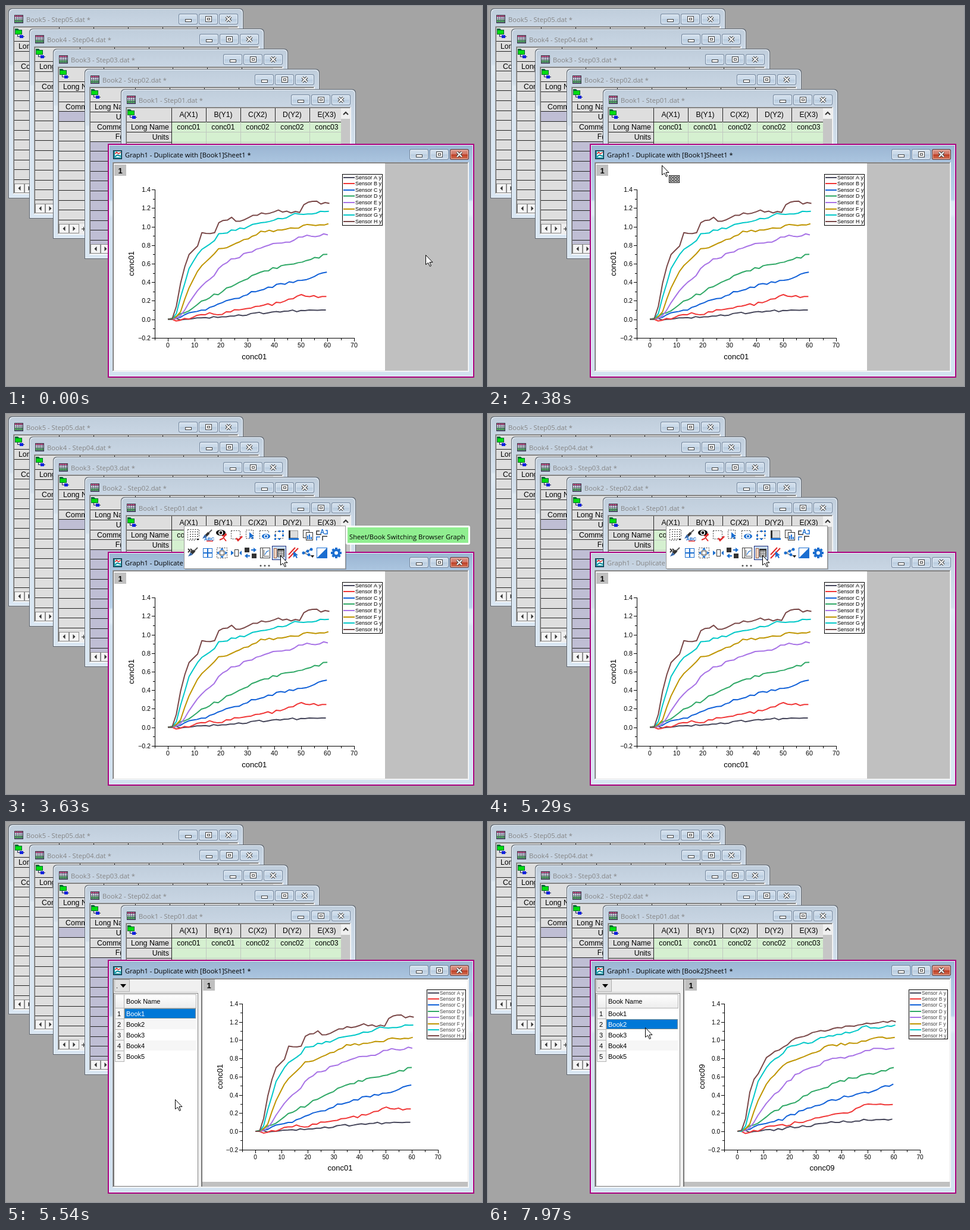
Animation, 800 px wide and 640 px high, one loop 8000 ms. Source, as an HTML page with a canvas:

```html
<!DOCTYPE html>
<html lang="en">
<head>
<meta charset="utf-8">
<title>Graph browser</title>
<style>
html, body { margin: 0; width: 100%; height: 100%; overflow: hidden; background: #a4a4a4; }
canvas { display: block; }
</style>
</head>
<body>
<canvas id="stage" width="800" height="640"></canvas>
<script>
const c = document.getElementById('stage').getContext('2d');
const UI = '11.23px "Open Sans", sans-serif';
const sans = size => `${size}px "Liberation Sans", Arial, sans-serif`;
const BLUE = '#1b6ed0', RED = '#e02828';

// ---------- helpers ----------
function rect(x, y, w, h, fill) {
  c.fillStyle = fill;
  c.fillRect(x, y, w, h);
}
function box(x, y, w, h, fill, edge) {
  rect(x, y, w, h, edge);
  rect(x + 1, y + 1, w - 2, h - 2, fill);
}
function rounded(x, y, w, h, radii, fill) {
  c.beginPath();
  c.roundRect(x, y, w, h, radii);
  c.fillStyle = fill;
  c.fill();
}
function sunken(x, y, w, h, fill) {
  rect(x, y, w, h, '#fff');
  rect(x, y, w - 1, h - 1, '#a0a0a0');
  rect(x + 1, y + 1, w - 2, h - 2, '#e3e3e3');
  rect(x + 1, y + 1, w - 3, h - 3, '#696969');
  rect(x + 2, y + 2, w - 4, h - 4, fill);
}
function text(s, x, y, font, color = '#000', align = 'left') {
  c.font = font;
  c.fillStyle = color;
  c.textAlign = align;
  c.fillText(s, x, y);
}
function path(pts) {
  c.beginPath();
  for (let i = 0; i < pts.length; i += 2) c.lineTo(pts[i], pts[i + 1]);
}
function line(color, width, ...pts) {
  path(pts);
  c.strokeStyle = color;
  c.lineWidth = width;
  c.stroke();
}
function poly(color, ...pts) {
  path(pts);
  c.closePath();
  c.fillStyle = color;
  c.fill();
}
function disc(x, y, r, color, ry = r) {
  c.beginPath();
  c.ellipse(x, y, r, ry, 0, 0, 7);
  c.fillStyle = color;
  c.fill();
}
function fade(y0, y1, ...stops) {
  const g = c.createLinearGradient(0, y0, 0, y1);
  for (let i = 0; i < stops.length; i += 2) g.addColorStop(stops[i], stops[i + 1]);
  return g;
}
function dashed(x, y, w, h) {
  c.setLineDash([2, 2]);
  line('#333', 1, x, y, x + w, y, x + w, y + h, x, y + h, x, y);
  c.setLineDash([]);
}

// ---------- windows ----------
function button(x, y, kind, red) {
  rounded(x, y, 32, 18, 3, red ? '#5a2a28' : '#71859d');
  rounded(x + 1, y + 1, 30, 16, 2, red ? '#eac0b6' : '#e6eef6');
  rect(x + 2, y + 2, 28, 14, red
    ? fade(y, y + 18, 0, '#e0a094', .48, '#d07464', .5, '#bd3b22', 1, '#d47b5e')
    : fade(y, y + 18, 0, '#d6e2ee', .48, '#c8d8e8', .5, '#b8cbde', 1, '#d0dfee'));
  if (kind === 0) box(x + 11, y + 9, 11, 5, '#fff', '#444');
  if (kind === 1) {
    box(x + 11, y + 4, 11, 10, '#fff', '#444');
    box(x + 14, y + 7, 5, 4, '#fff', '#444');
  }
  if (kind === 2) for (const [w, color] of [[4.2, '#444'], [2, '#fff']]) {
    line(color, w, x + 12, y + 5, x + 20, y + 13);
    line(color, w, x + 20, y + 5, x + 12, y + 13);
  }
}
function frame(x, y, w, h, title, active, edge, e, corner) {
  const top = [corner, corner, 0, 0];
  rounded(x, y, w, h, top, edge);
  rounded(x + e, y + e, w - 2 * e, h - 2 * e, top, '#eef4fa');
  rounded(x + e + 1, y + e + 1, w - 2 * e - 2, h - 2 * e - 2, top, active
    ? fade(y, y + 125, 0, '#99b4d1', .25, '#abc5e0', .75, '#b9d1ea', .78, '#dbeaf6', .95, '#e0ecf7', 1, '#d3e2f0')
    : fade(y, y + 125, 0, '#bfcddb', .25, '#c9d6e4', .75, '#d3e0ec', .78, '#e0ebf4', 1, '#d9e6f2'));
  text(title, x + 31 - e, y + 23, UI, active ? '#000' : '#858585');
  for (let i = 0; i < 3; i++) button(x + w - 109 + 34 * i, y + 9, i, active && i === 2);
}
function bookIcon(x, y) {
  box(x, y, 15, 14, '#fff', '#334');
  rect(x + 1, y + 1, 13, 3, '#e58');
  rect(x + 1, y + 8, 13, 5, '#4c4');
  for (let i = 3; i < 14; i += 3) {
    rect(x + i, y + 1, 1, 12, '#446');
    rect(x + 1, y + i, 13, 1, '#668');
  }
}
function folderIcon(x, y) {
  poly('#063', x, y, x + 5, y, x + 7, y + 2, x + 12, y + 2, x + 12, y + 10, x, y + 10);
  poly('#0d1', x + 1, y + 3, x + 11, y + 3, x + 11, y + 9, x + 1, y + 9);
  line('#225', 1, x + 4.5, y + 10, x + 4.5, y + 13.5, x + 16, y + 13.5);
  rect(x + 8, y + 11, 6, 5, '#12d');
}
function scrollButton(x, y, dir) {
  box(x, y, 17, 16, '#f4f4f4', '#8a8a8a');
  poly('#333', x + 8.5 + 2 * dir, y + 8, x + 8.5 - 2 * dir, y + 4, x + 8.5 - 2 * dir, y + 12);
}
function bookWindow(n, x, y) {
  frame(x, y, 395, 320, `Book${n} - Step0${n}.dat *`, false, '#5c6672', 1, 6);
  bookIcon(x + 10, y + 11);
  sunken(x + 8, y + 30, 379, 283, '#dedede');
  for (let i = 0; i < 5; i++) rect(x + 85 + 58 * i, y + 55, 58, 240, '#d5f0d0');
  for (let k = 0; k < 15; k++) {
    const top = y + Math.round(55.4 + 16.6 * k);
    if (top > y + 290) break;
    const picked = n === 3 ? k === 3 : n === 2 && k > 3;
    rect(x + 10, top, 75, 17, picked ? '#bfbed4' : '#dedede');
    rect(x + 10, top, 75, 1, '#222');
    rect(x + 85, top, 285, 1, k ? '#c0c8c0' : '#222');
    const label = ['Long Name', 'Units', 'Comments', 'F(x)='][k];
    if (label && !picked) text(label, x + 81, top + 13, sans(12.4), '#000', 'right');
  }
  for (let i = 0; i < 5; i++) {
    const left = x + 85 + 58 * i;
    rect(left, y + 32, 1, 23, '#222');
    rect(left, y + 55, 1, 240, i ? '#c0c8c0' : '#222');
    const id = (i >> 1) + 1;
    text('ABCDE'[i] + (i % 2 ? `(Y${id})` : `(X${id})`), left + 29, y + 47, sans(12.2), '#000', 'center');
    text('conc0' + id, left + 29, y + 68, sans(12.2), '#000', 'center');
  }
  rect(x + 370, y + 32, 15, 263, '#f0f0f0');
  rect(x + 370, y + 50, 15, 200, '#c6c6c6');
  line('#333', 2, x + 374, y + 43, x + 378, y + 39, x + 382, y + 43);
  rect(x + 10, y + 295, 375, 16, '#eee');
  scrollButton(x + 10, y + 295, -1);
  scrollButton(x + 27, y + 295, 1);
  line('#222', 1, x + 48, y + 303.5, x + 54, y + 303.5);
  line('#222', 1, x + 51.5, y + 300, x + 51.5, y + 307);
  folderIcon(x + 11, y + 34);
}

// ---------- chart ----------
const COLORS = ['#46465a', '#f03737', '#1060d8', '#2fa866', '#a873e6', '#bf9500', '#00c8c8', '#7a4848'];
const KNOTS = [0, 1.6, 3.2, 4.8, 6.4, 8, 11.2, 12.8, 17.6, 19.2, 22.4, 28.8, 35.2, 43.2, 49.6, 51.2, 60];
const LEVELS = [
  [0, 0, .01, -.01, 0, 0, .015, .015, .02, .03, .035, .045, .07, .085, .09, .09, .1],
  [0, 0, -.02, -.01, .01, 0, .045, .05, .065, .055, .08, .105, .145, .18, .26, .245, .245],
  [0, 0, .02, .02, .05, .07, .085, .1, .13, .155, .195, .255, .33, .38, .42, .43, .51],
  [0, .01, .03, .06, .07, .09, .16, .2, .27, .28, .33, .425, .5, .58, .625, .62, .7],
  [0, 0, .01, .04, .1, .18, .31, .36, .49, .54, .62, .7, .785, .82, .88, .895, .91],
  [0, 0, .03, .08, .22, .34, .52, .58, .72, .76, .785, .855, .94, .965, .99, 1.02, 1.03],
  [0, 0, .06, .24, .39, .55, .7, .755, .86, .93, .945, .985, 1.05, 1.09, 1.15, 1.12, 1.165],
  [0, 0, .14, .39, .57, .7, .79, .935, .93, 1.04, 1.085, 1.075, 1.13, 1.18, 1.13, 1.26, 1.25]
];
const SMOOTH = [0, .01, .14, .43, .57, .63, .81, .84, .92, .96, 1.01, 1.07, 1.12, 1.15, 1.18, 1.19, 1.2];

function noise(n) {
  const v = Math.sin(n * 12.9898) * 43758.5453;
  return 2 * (v - Math.floor(v)) - 1;
}
function level(row, x) {
  let k = 1;
  while (k < KNOTS.length - 1 && x > KNOTS[k]) k++;
  const u = (x - KNOTS[k - 1]) / (KNOTS[k] - KNOTS[k - 1]);
  return row[k - 1] + (row[k] - row[k - 1]) * Math.min(u, 1);
}
function sample(book, i, j, x) {
  const second = book === 2;
  const row = second && i === 7 ? SMOOTH : LEVELS[i];
  const gain = second ? [1.35, 1.2, 1.02][i] || 1 : 1;
  const amp = j < 9 || j === 38 ? 0 : i === 7 && !second ? .025 : .014;
  return level(row, x) * gain + noise(book * 1000 + i * 50 + j) * amp;
}
const WIDE = { x: 272, y: 527.5, kx: 4.471, ky: 156, font: 10.7, gap: 32, side: 39,
  lx: 565, ly: 283, lw: 68, lh: 87, step: 10.6, lf: 9, lc: '#000' };
const NARROW = { x: 419, y: 521, kx: 4.386, ky: 153.75, font: 10.1, gap: 31, side: 37,
  lx: 707, ly: 282, lw: 66, lh: 84, step: 10.4, lf: 8.4, lc: '#444' };

function chart(o, book) {
  const X = v => o.x + v * o.kx, Y = v => o.y - v * o.ky;
  const left = Math.round(X(-5)), bottom = Math.round(Y(-.2));
  rect(left, Math.round(Y(1.4)), 1, bottom - Math.round(Y(1.4)) + 1, '#000');
  rect(left, bottom, Math.round(X(70)) - left + 1, 1, '#000');
  for (let i = -1; i <= 14; i++) {
    const x = Math.round(X(i * 5)), major = i % 2 === 0;
    rect(x, bottom, 1, major ? 6 : 4, '#000');
    if (major) text(i * 5, x, bottom + 16, sans(o.font), '#000', 'center');
  }
  for (let i = -2; i <= 14; i++) {
    const y = Math.round(Y(i / 10)), major = i % 2 === 0;
    rect(left - (major ? 5 : 3), y, major ? 5 : 3, 1, '#000');
    if (major) text((i / 10).toFixed(1).replace('-', '−'), left - 7, y + 4, sans(o.font), '#000', 'right');
  }
  const title = book === 2 ? 'conc09' : 'conc01';
  text(title, X(32.5), bottom + o.gap + 4, sans(13), '#000', 'center');
  c.save();
  c.translate(left - o.side + 4, Y(.6));
  c.rotate(-Math.PI / 2);
  text(title, 0, 0, sans(13), '#000', 'center');
  c.restore();

  c.lineJoin = 'round';
  COLORS.forEach((color, i) => {
    const pts = [];
    for (let j = 0; j <= 38; j++) {
      const x = j * (59.4 + .19 * i) / 38;
      pts.push(X(x), Y(sample(book, i, j, x)));
    }
    line(color, 2, ...pts);
  });
  c.lineJoin = 'miter';

  box(o.lx, o.ly, o.lw, o.lh, '#fff', '#000');
  COLORS.forEach((color, i) => {
    const y = o.ly + 5.6 + o.step * i;
    rect(o.lx + 2, Math.round(y) - 1, 19, 2, color);
    text(`Sensor ${'ABCDEFGH'[i]} y`, o.lx + 22, y + 3, sans(o.lf), o.lc);
  });
}
function layerTag(x, y) {
  rect(x, y, 20, 19, '#c0c0c0');
  text('1', x + 10, y + 15, 'bold ' + sans(13), '#000', 'center');
}

// ---------- browser panel ----------
function panel(selected) {
  rect(181, 265, 148, 349, '#f0f0f0');
  box(182, 265, 26, 21, '#e1e1e1', '#adadad');
  text('.', 185, 280, sans(11));
  poly('#000', 192, 273, 202, 273, 197, 279);
  rect(208, 285, 114, 1, '#dadada');
  box(181, 288, 142, 326, '#fff', '#828282');
  box(183, 290, 137, 24, fade(290, 314, 0, '#fff', 1, '#ececec'), '#b4b4b4');
  rect(198, 290, 1, 24, '#b4b4b4');
  text('Book Name', 202, 306, sans(11));
  for (let i = 1; i <= 5; i++) {
    const y = 296 + 18 * i, on = i === selected;
    box(183, y - 1, 16, 19, '#f4f4f4', '#b4b4b4');
    text(i, 190, y + 13, sans(11), '#000', 'center');
    rect(199, y, 120, 17, on ? '#0078d7' : i % 2 ? '#fff' : '#f6f6f6');
    if (on) {
      c.setLineDash([1, 1]);
      line('#e8a050', 1, 199.5, y + .5, 318.5, y + .5, 318.5, y + 16.5, 199.5, y + 16.5, 199.5, y);
      c.setLineDash([]);
    }
    text('Book' + i, 202, y + 13, sans(11), on ? '#fff' : '#000');
  }
  rect(328, 264, 2, 350, '#777');
}
function halfDrawnPanel() {
  rect(303, 307, 17, 272, '#f5f5f5');
  rect(304, 307, 15, 17, '#c0c0c0');
  rect(200, 597, 86, 16, '#f5f5f5');
  rect(200, 597, 17, 15, '#c0c0c0');
  rect(328, 265, 2, 349, '#777');
}
function graphIcon(x, y) {
  box(x, y, 15, 15, '#1a8c9c', '#123');
  rect(x + 3, y + 2, 10, 10, '#e8ffff');
  line('#d33', 1.5, x + 3, y + 6, x + 6, y + 3, x + 9, y + 6, x + 13, y + 3);
  line('#089', 2, x + 3, y + 11, x + 7, y + 8, x + 13, y + 10);
}
function graphWindow(t) {
  const split = t >= 5510, active = t < 5290 || t >= 5540;
  frame(171, 232, 616, 394, `Graph1 - Duplicate with [Book${t < 7810 ? 1 : 2}]Sheet1 *`, active, '#a8007f', 2, 0);
  graphIcon(180, 243);
  sunken(179, 263, 599, 353, '#c0c0c0');
  if (split) {
    rect(330, 265, 446, 341, '#fff');
    layerTag(331, 265);
    chart(NARROW, t < 7970 ? 1 : 2);
    panel(t < 7970 ? 1 : 2);
  } else {
    rect(181, 265, 456, 349, '#fff');
    layerTag(182, 267);
    chart(WIDE, 1);
    if (t >= 5450) halfDrawnPanel();
  }
}

// ---------- mini toolbar, each icon drawn around its centre ----------
function brush() {
  line('#333', 4, -3, 1, 2, -4);
  line('#555', 2, 2, -4, 7, -9);
  poly('#36a', -9, 6, -5, -1, -1, 3);
}
function eye(x, y, r, color) {
  disc(x, y, r, color, r * .6);
  disc(x, y, r * .5, '#fff');
  disc(x, y, r * .3, color);
}
function pointer(x, y, color) {
  poly(color, x, y, x, y + 11, x + 3, y + 8, x + 5, y + 12, x + 7, y + 11, x + 5, y + 7, x + 8, y + 7);
}
function nodes() {
  line('#333', 1, -6, 0, 5, -6);
  line('#333', 1, -6, 0, 5, 5);
  for (const [x, y] of [[-7, 0], [0, -3], [6, -6], [2, 3]]) disc(x, y, 2.5, BLUE);
}
function arrows4(r) {
  for (let i = 0; i < 4; i++) {
    poly(BLUE, 0, -r, -3, 4 - r, 3, 4 - r);
    c.rotate(Math.PI / 2);
  }
}
const ICONS = [[
  () => {
    dashed(-9.5, -9.5, 19, 18);
    for (let x = -6; x < 9; x += 4) for (let y = -6; y < 8; y += 4) {
      rect(x, y, 2, 1, '#222');
    }
    rect(4, 4, 7, 6, '#fff');
    poly('#000', 5, 6, 10, 6, 7.5, 9);
  },
  () => { brush(); text('ABC', -6, 9, 'bold ' + sans(8), BLUE); line(RED, 1.5, -2, 10, 9, 10); },
  () => {
    eye(-2, -4, 8, '#000');
    line(RED, 2, 0, 1, 5, 1, 1, 6, -4, 8);
    line(RED, 2, 3, 5, 7, 10);
    disc(6, -1, 2, RED);
  },
  () => { dashed(-8.5, -7.5, 15, 14); line(RED, 2.5, 0, 5, 3, 9, 10, 2); },
  () => { dashed(-7.5, -8.5, 12, 14); pointer(-2, -5, BLUE); },
  () => { dashed(-8.5, -7.5, 15, 14); rect(-6, -4, 16, 12, '#fff'); eye(2, 2, 7, BLUE); },
  () => {
    dashed(-6.5, -6.5, 13, 12);
    for (const [x, y] of [[-8, -1], [5, -1], [-1, -8], [-1, 5], [5, -8], [-8, 5]]) rect(x, y, 3, 3, BLUE);
  },
  () => { box(-6, -8, 14, 13, '#ddd', '#999'); rect(-8, -8, 3, 16, '#333'); rect(-8, 5, 17, 3, BLUE); },
  () => {
    box(-8, -9, 11, 14, '#fff', '#333');
    box(-3, -5, 12, 14, '#fff', '#333');
    rect(-1, 1, 2, 6, BLUE); rect(2, -1, 2, 8, BLUE); rect(5, 3, 2, 4, BLUE);
  },
  () => {
    text('A', -3, -2, 'bold ' + sans(10), BLUE);
    line('#333', 1.5, -4, -7, -9, -7, -9, -1, -1, -1);
    line('#333', 1.5, 9, 2, 1, 2, 1, 9);
    line(BLUE, 1.5, -9, 9, -9, 3, -3, 3);
    line(BLUE, 1.5, 6, -8, 9, -8, 9, -2, 4, -2);
  }
], [
  () => {
    brush();
    line('#333', 2, -9, -7, -6, -4, -9, -1);
    line('#333', 2, -5, -7, -2, -4, -5, -1);
  },
  () => { box(-8, -8, 16, 16, '#fff', BLUE); rect(-1, -8, 2, 16, BLUE); rect(-8, -1, 16, 2, BLUE); },
  () => { dashed(-8.5, -8.5, 17, 17); box(-4, -4, 8, 8, '#fff', '#333'); arrows4(9); },
  () => { box(-3, -6, 7, 12, '#fff', '#333'); poly(BLUE, -9, -4, -4, 0, -9, 4); poly(BLUE, 9, -4, 5, 0, 9, 4); },
  () => {
    rect(-10, -9, 8, 8, '#333'); rect(2, 1, 8, 8, '#333');
    line(BLUE, 2, 1, -5, 9, -5); poly(BLUE, 5, -9, 10, -5, 5, -1);
    line(BLUE, 2, -1, 5, -9, 5); poly(BLUE, -5, 1, -10, 5, -5, 9);
  },
  () => {
    box(-8, -9, 17, 18, '#fff', '#444');
    rect(-4, -8, 1, 16, '#444');
    line('#555', 1, -1.5, -5, -1.5, 5.5, 7, 5.5);
    line(BLUE, 1.2, 0, 3, 3, -2, 7, -4);
  },
  () => {
    box(-9, -8, 5, 17, '#f4e0d0', '#a64');
    box(-3, -7, 12, 14, '#fff', '#333');
    rect(-3, -7, 12, 3, '#333');
    for (let i = 1; i < 12; i += 3) { rect(i - 3, -4, 1, 11, '#666'); rect(-3, i - 4, 12, 1, '#666'); }
  },
  () => {
    line(RED, 2, -8, 3, 3, -9);
    line(RED, 2, -8, 9, 8, -8);
    pointer(0, -3, BLUE);
  },
  () => { nodes(); poly('#000', 5, 4, 11, 4, 8, 8); },
  () => { box(-9, -9, 18, 18, '#fff', BLUE); poly(BLUE, 9, -9, 9, 9, -9, 9); },
  () => {
    for (let i = 0; i < 8; i++) { rect(-2, -9, 4, 6, BLUE); c.rotate(Math.PI / 4); }
    disc(0, 0, 7, BLUE);
    disc(0, 0, 3, '#fff');
  }
]];
function toolbar(hover) {
  rect(301, 190, 271, 72, 'rgba(0,0,0,.25)');
  box(299, 188, 272, 73, '#fff', '#9a9a9a');
  if (hover) box(447, 222, 24, 24, '#c8dcf4', '#1a2a78');
  ICONS.forEach((row, r) => row.forEach((icon, i) => {
    c.save();
    c.translate(315 + 24 * i, 204 + 30 * r);
    icon();
    c.restore();
  }));
  for (let i = -1; i < 2; i++) disc(435 + 7 * i, 255.5, 1.5, '#555');
}
function tooltip() {
  rounded(571, 188, 209, 32, 3, '#fff');
  rect(574, 191, 203, 26, '#90ee90');
  text('Sheet/Book Switching Browser Graph', 577, 211, UI);
}

// ---------- pointer ----------
const easeOut = p => u => 1 - (1 - u) ** p;
const smooth = u => u * u * (3 - 2 * u);
// start, end, x, y, easing of x, easing of y
const MOVES = [
  [790, 1570, 305, 276, easeOut(2.03), easeOut(2.41)],
  [1570, 1630, 300, 275, smooth, smooth],
  [1760, 1820, 292, 268, smooth, smooth],
  [2810, 3600, 461, 238, smooth, smooth],
  [5539, 5540, 284, 467, smooth, smooth],
  [6785, 7160, 264, 351, smooth, smooth],
  [7560, 7650, 264, 346, smooth, smooth]
];
function pointerAt(t) {
  let x = 705, y = 419;
  for (const [from, to, tx, ty, ex, ey] of MOVES) {
    if (t < from) break;
    const tick = to - Math.ceil((to - t) / 30) * 30;
    const u = t >= to ? 1 : Math.max(0, (tick - from) / (to - from));
    x += (tx - x) * ex(u);
    y += (ty - y) * ey(u);
  }
  return [Math.round(x), Math.round(y)];
}
function cursor(x, y, badge) {
  const shape = [0, 0, 0, 16, 4, 13, 7, 19, 9, 18, 6.5, 12, 11.5, 12].map((v, i) => v + .5 + (i % 2 ? y : x));
  poly('#fff', ...shape);
  line('#000', 1, ...shape, shape[0], shape[1]);
  if (!badge) return;
  box(x + 12, y + 17, 18, 13, '#fff', '#000');
  for (let i = 0; i < 6; i++) box(x + 14 + i % 3 * 5, y + 19 + (i > 2) * 5, 4, 4, '#fff', '#000');
}

function draw(t) {
  rect(0, 0, 800, 640, '#a4a4a4');
  bookWindow(5, 4, 4);
  bookWindow(4, 39, 38);
  bookWindow(3, 79, 72);
  bookWindow(2, 132, 106);
  bookWindow(1, 193, 140);
  graphWindow(t);
  const [x, y] = pointerAt(t);
  if (t >= 2410 && t < 5510) toolbar(x >= 447);
  if (t >= 3630 && t < 5290) tooltip();
  cursor(x, y, t >= 2080 && t < 2810);
}
const start = performance.now();
function loop() {
  draw((performance.now() - start) % 8000);
  requestAnimationFrame(loop);
}
loop();
</script>
</body>
</html>
```
